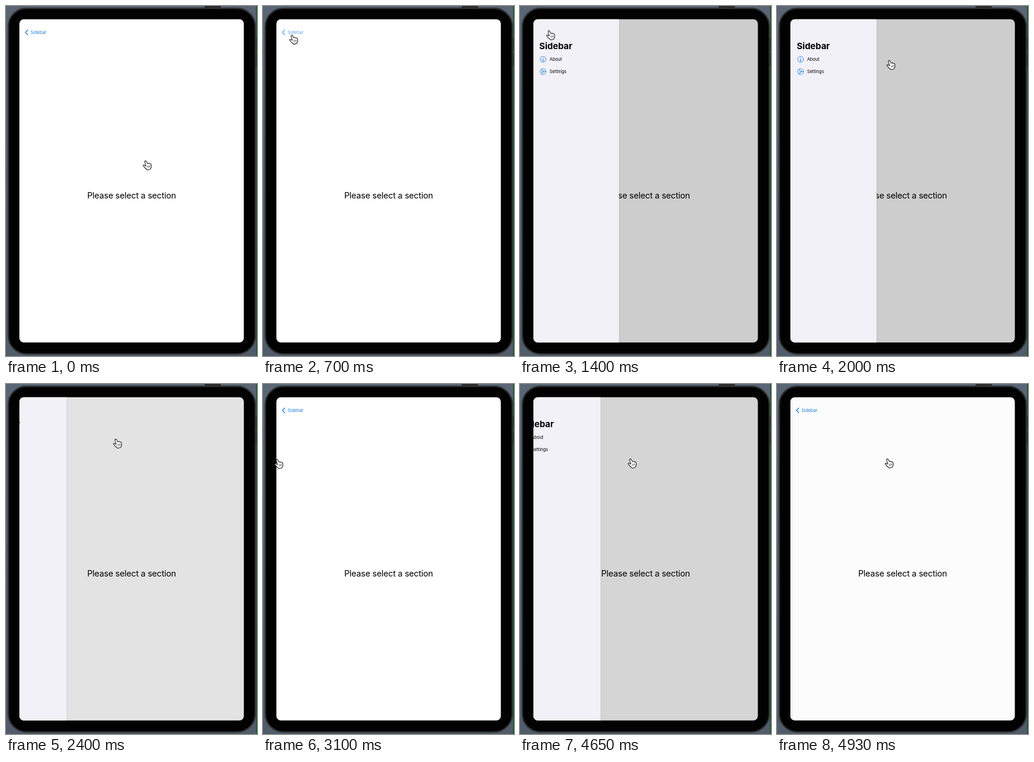
Recreate the animation shown at these times as an HTML page. Size 431x600 px, loop 5.02 s.

```html
<!DOCTYPE html>
<html lang="en">
<head>
<meta charset="utf-8">
<title>Sidebar demo</title>
<style>
  html, body { margin: 0; width: 100%; height: 100%; overflow: hidden; background: #56616f; }
  svg { display: block; width: 431px; height: 600px; }
  text { font-family: Inter, "Liberation Sans", sans-serif; }
  .blue { fill: none; stroke: #2383dc; stroke-linecap: round; stroke-linejoin: round; }
</style>
</head>
<body>
<svg viewBox="0 0 431 600">
  <defs>
    <linearGradient id="desk" x2="0" y2="1">
      <stop offset="0" stop-color="#5a6675"/>
      <stop offset="1" stop-color="#515c6a"/>
    </linearGradient>
    <clipPath id="screen"><rect x="23" y="22.8" width="385.4" height="553.9" rx="7.5"/></clipPath>
  </defs>

  <!-- device -->
  <rect width="431" height="600" fill="url(#desk)"/>
  <rect x="429.5" width="1.5" height="600" fill="#1a5526"/>
  <rect x="341" y="0" width="28" height="4" rx="1" fill="#2b2b2d"/>
  <path d="M429 55v23M429 81v22" stroke="#2b2b2d" stroke-width="2"/>
  <rect x="4" y="4" width="424" height="592.5" rx="31" fill="#020202" stroke="#303033" stroke-width="2.4"/>

  <g clip-path="url(#screen)">
    <rect x="22" y="22" width="388" height="556" fill="#fff"/>
    <rect id="dim" x="22" y="22" width="388" height="556" opacity="0"/>
    <text x="139.5" y="330" font-size="14.5" letter-spacing="-.2">Please select a section</text>
    <g id="back">
      <path class="blue" stroke-width="1.5" d="M37.3 41.2 33.3 45.2 37.3 49.2"/>
      <text x="42" y="48" font-size="7.6" fill="#2383dc">Sidebar</text>
    </g>
    <g id="sheet">
      <rect x="22" y="22" width="150" height="556" opacity=".08"/>
      <rect x="22" y="22" width="149" height="556" fill="#f2f1f8"/>
      <text x="34" y="73.5" font-size="15" font-weight="700">Sidebar</text>
      <g class="blue" stroke-width=".9">
        <circle cx="40.5" cy="91.5" r="5"/>
        <path d="M40.5 88.7v.1M39.8 90.8h.8v3.2M39.4 94.1h2.3"/>
        <circle cx="40.5" cy="112.5" r="5"/>
        <circle cx="40.5" cy="112.5" r="1.3"/>
        <path d="M41.8 112.5h3.4M39.8 111.4l-1.9-3.2M39.8 113.6l-1.9 3.2"/>
      </g>
      <text x="51.7" y="94.2" font-size="7.5">About</text>
      <text x="51.7" y="115.2" font-size="7.5">Settings</text>
    </g>
  </g>

  <g id="hand" stroke="#222" stroke-linejoin="round" stroke-linecap="round">
    <path fill="#fff" stroke-width="1.1" d="M3.4 1.6Q4.6.1 5.9 1.7L7.9 5.6Q9.3 4.4 10.3 5.7Q11.7 4.7 12.4 6.2Q13.8 5.6 14.3 7.4L14.7 11.2Q14.6 12.6 13.5 13.5L13.2 15.2 7.4 16.7 6.5 15.2Q3.9 13.9 2.5 11.6L.8 9.6Q.3 8.3 1.7 8.1Q3 8.1 4.6 9.7L5.4 9.4 3.3 3.4Q2.9 2.4 3.4 1.6Z"/>
    <path fill="none" stroke-width=".7" d="M8 9.7l.8 2.8M10 9.3l.7 2.7M11.9 8.9l.6 2.7"/>
  </g>
</svg>

<script>
const LOOP = 5020, TICK = 50, LAST = 4930, WIDTH = 149;
const [dim, back, sheet, hand] =
  ["dim", "back", "sheet", "hand"].map(id => document.getElementById(id));

const home = { x: 235, y: 264.5 };
const moves = [
  { from: 50, to: 600, x: 45, y: 53 },      // towards the back button
  { from: 600, to: 850, x: 45, y: 41.5 },   // press
  { from: 1650, to: 2000, x: 188, y: 92.5 },
  { from: 2350, to: 2850, x: 42, y: 128.5 },
  { from: 2850, to: 3200, x: 14, y: 128.5 },
  { from: 3400, to: 3590, x: 185, y: 127.5 } // swipe in from the edge
];

// the sheet opens and closes in turn
const slides = [
  { start: 1020, rate: .019, dimRate: .019 },
  { start: 2320, rate: .019, dimRate: .019 },
  { start: 3400, rate: .02, dimRate: .023 },
  { start: 4600, rate: .0175, dimRate: .014 }
];

const ramp = (t, a, b) => Math.min(1, Math.max(0, (t - a) / (b - a)));
const smooth = k => k * k * (3 - 2 * k);
const spring = x => 1 - (1 + x) * Math.exp(-x); // critically damped, 0 to 1

function pointerAt(t) {
  let { x, y } = home;
  for (const m of moves) {
    const k = smooth(ramp(t, m.from, m.to));
    x += (m.x - x) * k;
    y += (m.y - y) * k;
  }
  return [x, y];
}

function sheetAt(t) {
  const i = slides.findLastIndex(s => s.start <= t);
  if (i < 0) return [0, 0];
  const { start, rate, dimRate } = slides[i];
  return [rate, dimRate].map(r => {
    const p = spring((t - start) * r);
    return i % 2 ? 1 - p : p;
  });
}

function draw(ms) {
  const t = ms >= LAST ? LAST : Math.floor(ms / TICK) * TICK;
  const [open, dark] = sheetAt(t);
  const [x, y] = pointerAt(t);
  sheet.setAttribute("transform", `translate(${(open - 1) * WIDTH - (open ? 0 : 1)} 0)`);
  dim.setAttribute("opacity", dark * .196);
  back.setAttribute("opacity", t < slides[1].start ? 1 - .75 * ramp(t, 600, 850) : 1);
  hand.setAttribute("transform", `translate(${x} ${y})`);
}

const begin = performance.now();
function frame() {
  draw((performance.now() - begin) % LOOP);
  requestAnimationFrame(frame);
}
frame();
</script>
</body>
</html>
```
